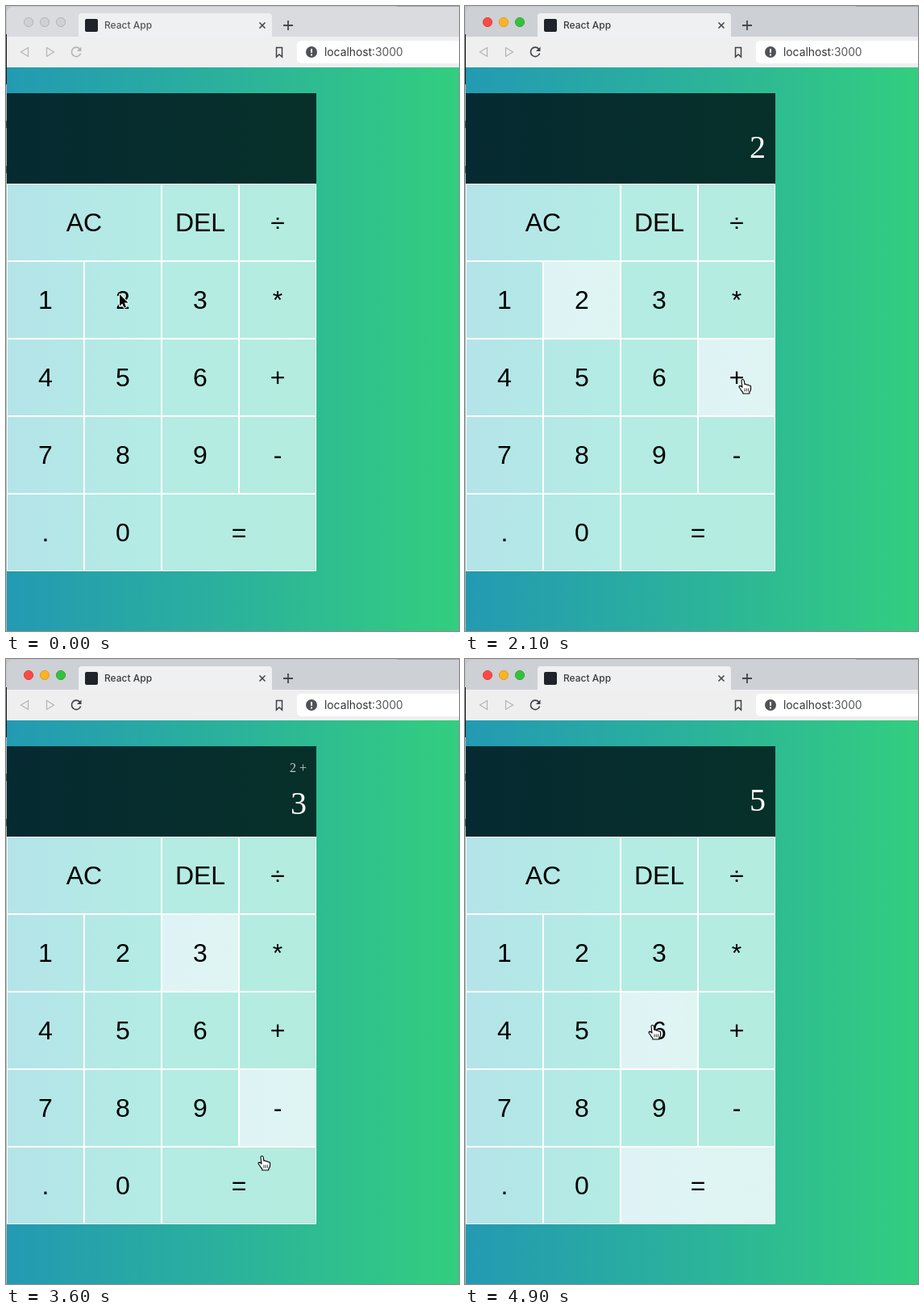
An HTML page with a canvas that plays this animation: 562x774 px, repeating every 5000 ms.

```html
<!DOCTYPE html>
<html lang="en">
<head>
<meta charset="utf-8">
<title>Calculator</title>
<style>
html, body { margin: 0; width: 100%; height: 100%; overflow: hidden; }
canvas { display: block; }
</style>
</head>
<body>
<canvas id="stage" width="562" height="774"></canvas>
<script>
const ctx = document.getElementById('stage').getContext('2d');
const LOOP = 5000, STEP = 100, CELL = 96, LEFT = 1, TOP = 220;
const SANS = '"Liberation Sans", Arial, sans-serif';
const SERIF = '"Liberation Serif", Times, serif';
const UI = 'Inter, Roboto, sans-serif';

// label, column, row, columns spanned
const keys = [
  ['AC', 0, 0, 2], ['DEL', 2, 0, 1], ['÷', 3, 0, 1],
  ['1', 0, 1, 1], ['2', 1, 1, 1], ['3', 2, 1, 1], ['*', 3, 1, 1],
  ['4', 0, 2, 1], ['5', 1, 2, 1], ['6', 2, 2, 1], ['+', 3, 2, 1],
  ['7', 0, 3, 1], ['8', 1, 3, 1], ['9', 2, 3, 1], ['-', 3, 3, 1],
  ['.', 0, 4, 1], ['0', 1, 4, 1], ['=', 2, 4, 2]
].map(([label, col, row, span]) => ({
  label, x: LEFT + col * CELL, y: TOP + row * CELL, w: span * CELL
}));

// time, x, y of the pointer hotspot
const path = [
  [0, 141, 357], [300, 141, 357], [700, 153, 360], [1400, 153, 360],
  [1800, 266, 425], [2000, 343, 460], [2100, 345, 463], [2400, 345, 463],
  [2700, 241, 419], [2900, 238, 372], [3200, 238, 372], [3500, 301, 560],
  [3600, 318, 616], [3700, 306, 638], [3900, 292, 643], [4300, 292, 643],
  [4600, 294, 560], [4800, 250, 478], [4900, 233, 454]
];
const ACTIVATE = 400;
const focusAt = [[0, ''], [800, '2'], [2200, '+'], [3000, '3'], [4000, '=']];
const displayAt = [
  [0, '', ''], [900, '', '2'], [2300, '2 +', ''], [3100, '2 +', '3'], [4100, '', '5']
];

const latest = (list, t) => list.filter(item => item[0] <= t).pop();

function pointer(t) {
  const i = path.findIndex(p => p[0] > t);
  if (i < 0) return path[path.length - 1].slice(1);
  const [t0, x0, y0] = path[i - 1], [t1, x1, y1] = path[i];
  const k = (t - t0) / (t1 - t0);
  return [Math.round(x0 + (x1 - x0) * k), Math.round(y0 + (y1 - y0) * k)];
}

function blend(x0, x1, ...colors) {
  const g = ctx.createLinearGradient(x0, 0, x1, 0);
  colors.forEach((c, i) => g.addColorStop(i / (colors.length - 1), c));
  return g;
}

function rect(x, y, w, h, color) {
  ctx.fillStyle = color;
  ctx.fillRect(x, y, w, h);
}

function round(x, y, w, h, r, color) {
  ctx.fillStyle = color;
  ctx.beginPath();
  ctx.roundRect(x, y, w, h, r);
  ctx.fill();
}

function dot(x, y, r, color, edge) {
  ctx.beginPath();
  ctx.arc(x, y, r, 0, Math.PI * 2);
  ctx.fillStyle = color;
  ctx.fill();
  if (edge) {
    ctx.strokeStyle = edge;
    ctx.lineWidth = 1;
    ctx.stroke();
  }
}

function stroke(d, color, width) {
  ctx.strokeStyle = color;
  ctx.lineWidth = width;
  ctx.stroke(new Path2D(d));
}

function text(str, x, y, font, color, align = 'left') {
  ctx.font = font;
  ctx.fillStyle = color;
  ctx.textAlign = align;
  ctx.fillText(str, x, y);
}

function drawBrowser(active) {
  rect(0, 0, 562, 76, '#c4c6c9');
  rect(485, 0, 77, 1, '#a3a5a8');
  round(1, 1, 570, 50, [7, 0, 0, 0], active ? '#cdd0d5' : '#d9dbdf');
  round(90, 9, 240, 32, [4, 4, 0, 0], '#eff0f1');
  rect(1, 38, 561, 38, '#efeff0');

  const lights = active
    ? [['#fc4943', '#e2413b'], ['#fbb324', '#dfa023'], ['#35c13c', '#2dab34']]
    : Array(3).fill(['#cfd0d3', '#b4b5b8']);
  lights.forEach(([fill, edge], i) => dot(28 + 20 * i, 20, 5.6, fill, edge));

  round(98, 16, 16, 16, 2, '#20242a');
  text('React App', 122, 28, `500 12px ${UI}`, active ? '#3a3c3f' : '#55575a');
  stroke('M314.5 20.5l7 7m0-7l-7 7', '#45474a', 1.6);
  stroke('M350 18v12m-6-6h12', '#45474a', 1.8);

  stroke('M27.5 51.5v11l-9-5.5z M50.5 51.5v11l9-5.5z', '#b3b4b6', 1.2);
  const reload = active ? '#3e4043' : '#b3b4b6';
  stroke('M91.5 53.2A5.7 5.7 0 1 0 92.6 58.5', reload, 1.6);
  ctx.fillStyle = reload;
  ctx.fill(new Path2D('M93.5 50.5v5.5h-5.5z'));
  stroke('M335.5 51.5h7v11.5l-3.5-3l-3.5 3z', '#3e4043', 1.5);

  round(361, 43, 210, 28, 5, '#fff');
  dot(379, 57, 7, '#505256');
  rect(378, 53, 2, 5, '#fff');
  rect(378, 59.5, 2, 2, '#fff');
  const url = `13.8px ${UI}`;
  text('localhost', 395, 62, url, '#333538');
  text(':3000', 395 + ctx.measureText('localhost').width, 62, url, '#55575a');
}

function drawPage() {
  rect(0, 76, 562, 698, '#a9b9bb');
  rect(0, 35, 1, 62, '#17191c');
  rect(0, 142, 1, 9, '#4a5557');
  rect(0, 198, 1, 9, '#4a5557');
  rect(1, 76, 561, 698, blend(1, 562, '#239ab3', '#2bb29b', '#33ce7f'));
}

function drawDisplay(prev, current) {
  rect(1, 108, 384, 112, blend(1, 385, '#062a31', '#07302a'));
  // the two lines share the spare height evenly around them
  const h1 = prev ? 18 : 0, h2 = current ? 46 : 0;
  const gap = (88 - h1 - h2) / 4;
  if (prev) {
    text(prev, 373, Math.round(120 + gap + 14.3), `16px ${SERIF}`, 'rgba(255,255,255,.75)', 'right');
  }
  if (current) {
    text(current, 373, Math.round(120 + gap * 3 + h1 + 36), `40px ${SERIF}`, '#fff', 'right');
  }
}

function drawKeys(hover, focus) {
  const base = blend(1, 385, '#b4e4e9', '#b4ece4', '#b4ecdf');
  for (const key of keys) {
    const { label, x, y, w } = key;
    const lit = key === hover || label === focus;
    rect(x, y, w, CELL, lit ? blend(x, x + w, '#dff3f6', '#dff5f2') : base);
    ctx.strokeStyle = '#fff';
    ctx.lineWidth = 1;
    ctx.strokeRect(x + .5, y + .5, w - 1, CELL - 1);
    text(label, x + w / 2, y + 59, `32px ${SANS}`, '#000', 'center');
  }
}

const arrow = new Path2D('M0 0V14.5L3.3 11.4L5.6 16.6L8 15.6L5.8 10.5H10.5Z');
const hand = new Path2D(
  'M-2 1Q-2 -.5 -.4 -.5Q1 -.5 1.2 1L2 5.6Q3.8 4.6 4.6 6.2Q6.4 5.4 7.1 7' +
  'Q9.6 6.6 9.6 9V11.5Q9.4 13.6 7.8 15.4V17H-.2V15.5Q-2 13.8 -3 11.8' +
  'L-4.8 9.2Q-5.4 7.4 -3.6 7.4Q-2.4 7.6 -1 9.2Z'
);

function drawPointer([x, y], isHand) {
  ctx.save();
  ctx.translate(x, y);
  ctx.lineJoin = 'round';
  if (isHand) {
    ctx.fillStyle = '#fff';
    ctx.fill(hand);
    ctx.strokeStyle = '#000';
    ctx.lineWidth = 1.1;
    ctx.stroke(hand);
    stroke('M2 10.5v4M4.3 10.5v4M6.6 10.5v4', '#000', .8);
  } else {
    ctx.strokeStyle = '#fff';
    ctx.lineWidth = 2;
    ctx.stroke(arrow);
    ctx.fillStyle = '#000';
    ctx.fill(arrow);
  }
  ctx.restore();
}

function draw(t) {
  const active = t >= ACTIVATE;
  // the highlight trails the pointer by one step
  const [hx, hy] = pointer(Math.max(0, t - STEP));
  const hover = active && keys.find(k =>
    hx >= k.x && hx < k.x + k.w && hy >= k.y && hy < k.y + CELL);
  const [, prev, current] = latest(displayAt, t);
  drawBrowser(active);
  drawPage();
  drawDisplay(prev, current);
  drawKeys(hover, latest(focusAt, t)[1]);
  drawPointer(pointer(t), active);
}

function tick() {
  const t = performance.now() % LOOP;
  draw(Math.floor(t / STEP) * STEP);
  requestAnimationFrame(tick);
}
tick();
</script>
</body>
</html>
```
